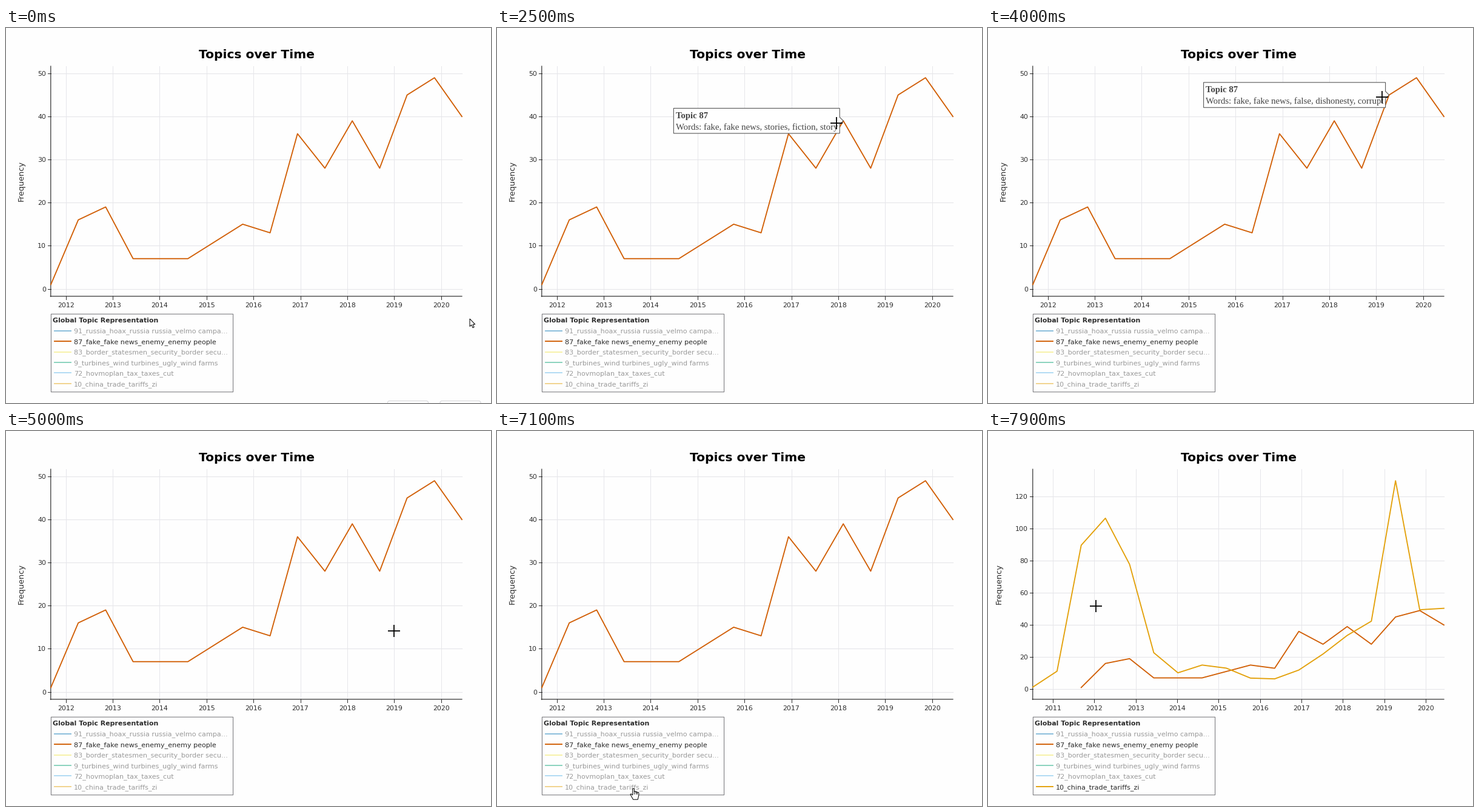
A matplotlib script for the animation above (8000 ms loop, 800x619 px).

```python
import math

import numpy as np
import matplotlib.pyplot as plt
from matplotlib.animation import FuncAnimation
from matplotlib.patches import FancyBboxPatch, Polygon, Rectangle

W, H, DPI = 800, 619, 64
PT = 72 / DPI
FRAMES, STEP = 80, 100
LEFT, RIGHT, TOP, BOTTOM = 74, 752, 63, 442.8
HIGH_Y, LOW_Y = 82.1, 423.4            # heights of the largest and smallest value
LAST_YEAR, BIN_YEARS = 2020.442, 0.584
INK, GRID, PAPER = "#2c2c2c", "#e6e6ea", "#fefefe"
RED, GOLD = "#D15E04", "#E3A008"
FADED = 0.47
SWITCH, HOLD = 7500, 400

fig = plt.figure(figsize=(W / DPI, H / DPI), dpi=DPI, facecolor=PAPER)
ax = fig.add_axes([0, 0, 1, 1])
ax.set_xlim(0, W)
ax.set_ylim(H, 0)
ax.axis("off")


def text(x, y, s, px, color=INK, font="DejaVu Sans", **kw):
    return ax.text(x, y, s, fontsize=px * PT, color=color, family=font, **kw)


def line(xs, ys, color, px=1.0, z=2, **kw):
    return ax.plot(xs, ys, color=color, lw=px * PT, zorder=z, **kw)[0]


def sigmoid(x):
    return 1 / (1 + np.exp(-x))


def bump(x, center, width):
    return np.exp(-((x - center) / width) ** 2)


# One value per time bin; both series end in the same bin
news = np.array([1, 16, 19, 7, 7, 7, 11, 15, 13, 36, 28, 39, 28, 45, 49, 40])
n = np.arange(18)
trade = (1 + 111 * sigmoid(3.7 * (n - 1.62)) * sigmoid(2.3 * (4.35 - n))
         + 14 * bump(n, 7.3, 1.5) + 50 * sigmoid(0.95 * (n - 12.35))
         + 82.7 * bump(n, 15, 0.3))


def scales(series):
    bins = max(map(len, series)) - 1
    low, high = min(map(min, series)), max(map(max, series))
    bin_px = (RIGHT - LEFT) / bins

    def year_x(year):
        return RIGHT - (LAST_YEAR - year) / BIN_YEARS * bin_px

    def value_y(v):
        return LOW_Y - (v - low) * (LOW_Y - HIGH_Y) / (high - low)

    def bin_x(count):
        return RIGHT - bin_px * np.arange(count)[::-1]

    first_year = math.ceil(LAST_YEAR - bins * BIN_YEARS)
    return year_x, value_y, bin_x, first_year, int(high)


def make_view(series, colors, tick, label_x):
    year_x, value_y, bin_x, first_year, high = scales(series)
    parts = [text(label_x, 252.5, "Frequency", 12.9, rotation=90,
                  ha="center", va="center")]
    for v in range(0, high + 2, tick):
        y = value_y(v)
        parts += [line([LEFT, RIGHT], [y, y], GRID, 1.1, 1),
                  line([68.5, LEFT], [y, y], INK),
                  text(66, y + 4, str(v), 11, ha="right")]
    for year in range(first_year, 2021):
        x = year_x(year)
        parts += [line([x, x], [TOP, BOTTOM], GRID, 1, 1),
                  line([x, x], [BOTTOM, 447.5], INK),
                  text(x, 461, str(year), 11, ha="center")]
    for vals, color in zip(series, colors):
        parts.append(line(bin_x(len(vals)), value_y(vals), color, 1.85, 3,
                          solid_joinstyle="round"))
    return parts


single = make_view([news], [RED], 10, 25)
double = make_view([news, trade], [RED, GOLD], 20, 18.5)

line([LEFT - 0.2] * 2, [TOP, BOTTOM + 0.5], INK, 1.2, snap=False)
line([LEFT - 0.7, RIGHT], [BOTTOM] * 2, INK, 1.2, snap=False)
text(413.5, 49.5, "Topics over Time", 20.25, "black", ha="center", weight="bold")

# Legend
ax.add_patch(Rectangle((74.4, 472.2), 300.2, 128.6, fc=PAPER, ec="#717175",
                       lw=PT, zorder=1, snap=False))
text(77, 486.5, "Global Topic Representation", 11.03, weight="bold")
topics = [
    ("91_russia_hoax_russia russia_velmo campa...", "#0072B2"),
    ("87_fake_fake news_enemy_enemy people", RED),
    ("83_border_statesmen_security_border secu...", "#F0E442"),
    ("9_turbines_wind turbines_ugly_wind farms", "#009E73"),
    ("72_hovmoplan_tax_taxes_cut", "#56B4E9"),
    ("10_china_trade_tariffs_zi", GOLD),
]
rows = []
for i, (name, color) in enumerate(topics):
    y = 499.6 + 17.45 * i
    alpha = 1 if i == 1 else FADED
    rows.append((line([79.5, 107], [y, y], color, 1.9, alpha=alpha),
                 text(112, y + 3.9, name, 11.13, alpha=alpha)))

# Page buttons peeking in at the bottom edge
buttons = [ax.add_patch(FancyBboxPatch(
    (x, 615.5), 67, 20, fc=PAPER, ec="#d4d4d8", lw=PT,
    boxstyle="round,pad=0,rounding_size=3")) for x in (629.5, 716)]

# Hover box
words = {
    9: "fake, fake news, enemy, fakenews, incorrect stories",
    10: "fake, fake news, media, reports, press",
    11: "fake, fake news, stories, fiction, story",
    13: "fake, fake news, false, dishonesty, corrupt",
}
_, value_y, bin_x, _, _ = scales([news])
points = np.column_stack([bin_x(len(news)), value_y(news)])
bubble = ax.add_patch(Polygon([(0, 0)], fc="white", ec="#555555",
                              lw=1.1 * PT, zorder=5))
SERIF = dict(font="Liberation Serif", color="#444444", zorder=6)
head = text(0, 0, "Topic 87", 14.74, weight="bold", **SERIF)
body = text(0, 0, "", 14.74, **SERIF)


# Pointers, drawn around their hot spot
def make_hand(scale=0.85):
    outline, gaps = [], []
    for k, top in enumerate((0, 5.5, 6.5, 7.5)):
        x = 3 * k - 1.5
        outline += [(x, top + 1), (x + 1, top), (x + 2, top), (x + 3, top + 1)]
        if k:
            gaps.append(scale * np.array([(x, top), (x, 10.5)]))
    outline += [(10.3, 14), (8.5, 21.5), (-0.5, 21.5), (-6, 11.5),
                (-4.5, 10.5), (-1.5, 13)]
    return scale * np.array(outline), gaps


hand, gaps = make_hand()
arrow = np.array([(0, 0), (0, 12.6), (2.9, 10), (5, 14.8), (7.1, 13.8),
                  (5.1, 9.2), (8.8, 9.2)])
pointer = ax.add_patch(Polygon(arrow, fc="white", ec="black", lw=PT, zorder=8))
knuckles = [line([], [], "black", 0.9, 9) for _ in gaps]
cross = [line([], [], "black", 1.8, 8, solid_capstyle="butt") for _ in range(2)]


def beside(i):
    return points[i] + (-11.5, 3.3)


# Arrival times and places; the pointer rests for HOLD at each
stops = [(0, (765, 480)), (1200, beside(9)), (2400, beside(11)),
         (3700, beside(13)), (4700, (640, 330)), (5600, (305, 581)),
         (7000, (225, 590)), (7900, (178, 289))]


def pointer_at(t):
    for (t0, p0), (t1, p1) in zip(stops, stops[1:]):
        if t <= t1:
            u = max(0, (t - t0 - HOLD) / (t1 - t0 - HOLD))
            u = u * u * (3 - 2 * u)
            return np.array(p0) * (1 - u) + np.array(p1) * u
    return np.array(stops[-1][1])


def show_hover(pos, active):
    near = [i for i in words if np.hypot(*(points[i] - pos)) < 20]
    on = active and bool(near)
    for part in (bubble, head, body):
        part.set_visible(on)
    if not on:
        return
    px, py = points[near[0]]
    body.set_text("Words: " + words[near[0]])
    extent = body.get_window_extent(fig.canvas.get_renderer())
    r = px - 6
    l = r - extent.width * W / fig.bbox.width - 6.5
    t, b = py - 20.7, py + 20.7
    bubble.set_xy([(px, py), (r, py - 6), (r, t), (l, t), (l, b), (r, b),
                   (r, py + 6)])
    head.set_position((l + 3.5, t + 16))
    body.set_position((l + 3.5, t + 35))


def show_pointer(pos):
    x, y = pos
    in_plot = LEFT < x < RIGHT and TOP < y < BOTTOM
    in_legend = LEFT < x < 374 and 490 < y < 600
    for c, (dx, dy) in zip(cross, ((10, 0), (0, 10))):
        c.set_visible(in_plot)
        c.set_data([x - dx, x + dx], [y - dy, y + dy])
    pointer.set_visible(not in_plot)
    pointer.set_xy((hand if in_legend else arrow) + pos)
    for k, gap in zip(knuckles, gaps):
        k.set_visible(in_legend)
        k.set_data(*(gap + pos).T)


def update(i):
    t = i * STEP
    both = t >= SWITCH
    for part in single:
        part.set_visible(not both)
    for part in double:
        part.set_visible(both)
    for part in rows[-1]:
        part.set_alpha(1 if both else FADED)
    for b in buttons:
        b.set_visible(t < HOLD)
    pos = pointer_at(t)
    show_hover(pos, not both)
    show_pointer(pos)
    return []


anim = FuncAnimation(fig, update, frames=FRAMES, interval=STEP,
                     repeat=True, repeat_delay=0, init_func=lambda: update(0))
plt.show()
```
